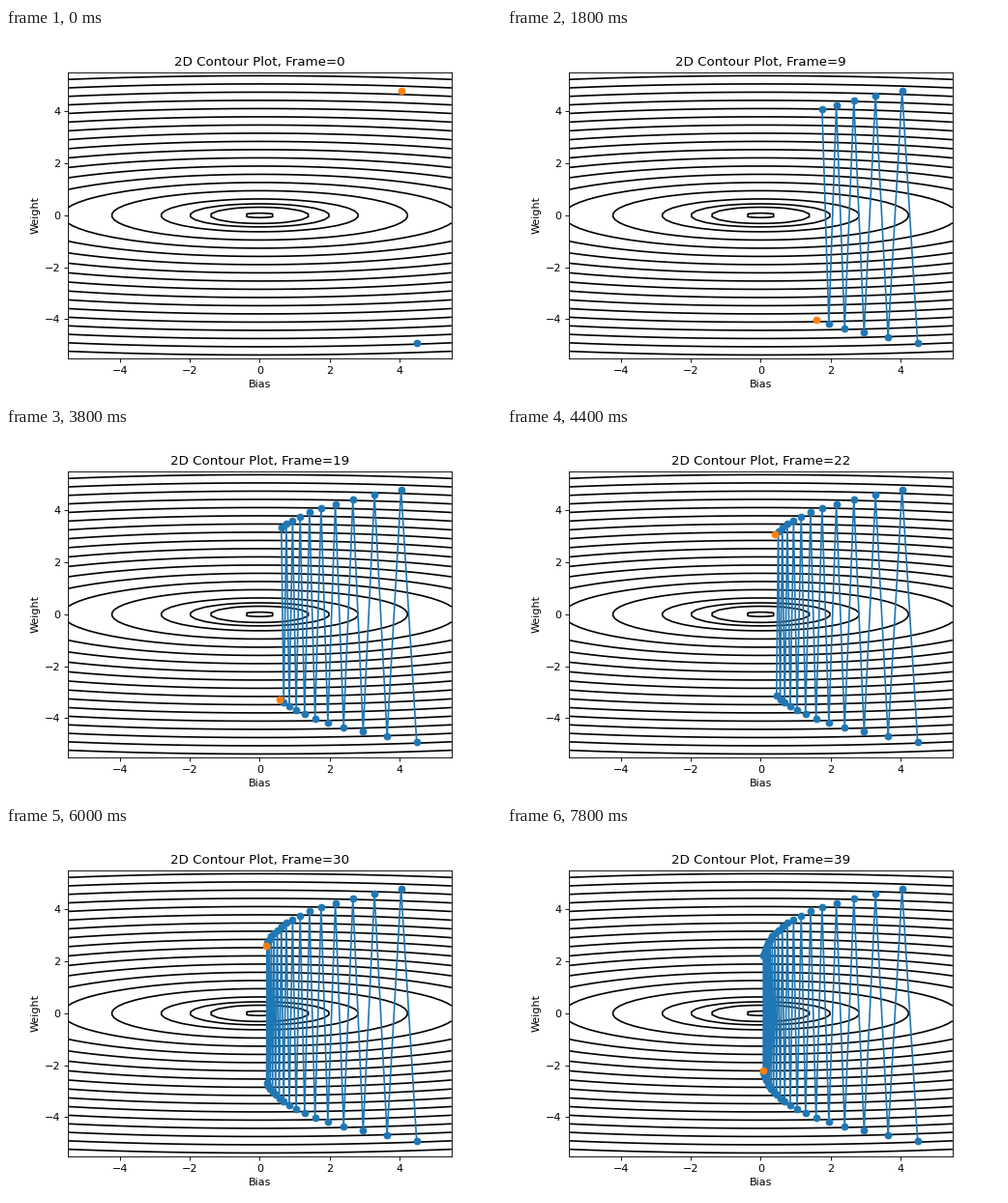
Write a matplotlib script that moves like this. It is 512x384 px and loops after 8000 ms.

```python
import numpy as np
import matplotlib.pyplot as plt
from matplotlib.animation import FuncAnimation

FRAMES = 40
INTERVAL = 200
LIMIT = 5.5
CURVATURE = np.array([1.0, 20.0])
START = np.array([4.5, -4.9])
RATE = 0.099


def loss(bias, weight):
    return 0.5 * (CURVATURE[0] * bias**2 + CURVATURE[1] * weight**2)


def descend(steps):
    """Gradient descent path on the quadratic loss."""
    path = [START]
    for _ in range(steps):
        path.append(path[-1] - RATE * CURVATURE * path[-1])
    return np.array(path)


path = descend(FRAMES)

fig, ax = plt.subplots(figsize=(6.4, 4.8), dpi=80)
grid = np.linspace(-LIMIT, LIMIT, 100)
bias, weight = np.meshgrid(grid, grid)
levels = [0.1, 1, 2] + [k**2 for k in range(2, 18)]
ax.contour(bias, weight, loss(bias, weight), levels=levels,
           colors="black", linewidths=1.5)
ax.set(xlim=(-LIMIT, LIMIT), ylim=(-LIMIT, LIMIT),
       xlabel="Bias", ylabel="Weight")

trail, = ax.plot([], [], "o-", color="tab:blue")
head, = ax.plot([], [], "o", color="tab:orange")
title = ax.set_title("")


def update(i):
    trail.set_data(path[:i + 1, 0], path[:i + 1, 1])
    head.set_data(path[i + 1:i + 2, 0], path[i + 1:i + 2, 1])
    title.set_text(f"2D Contour Plot, Frame={i}")
    return trail, head, title


anim = FuncAnimation(fig, update, frames=FRAMES, interval=INTERVAL,
                     init_func=lambda: update(0), repeat=True, repeat_delay=0)
plt.show()
```
